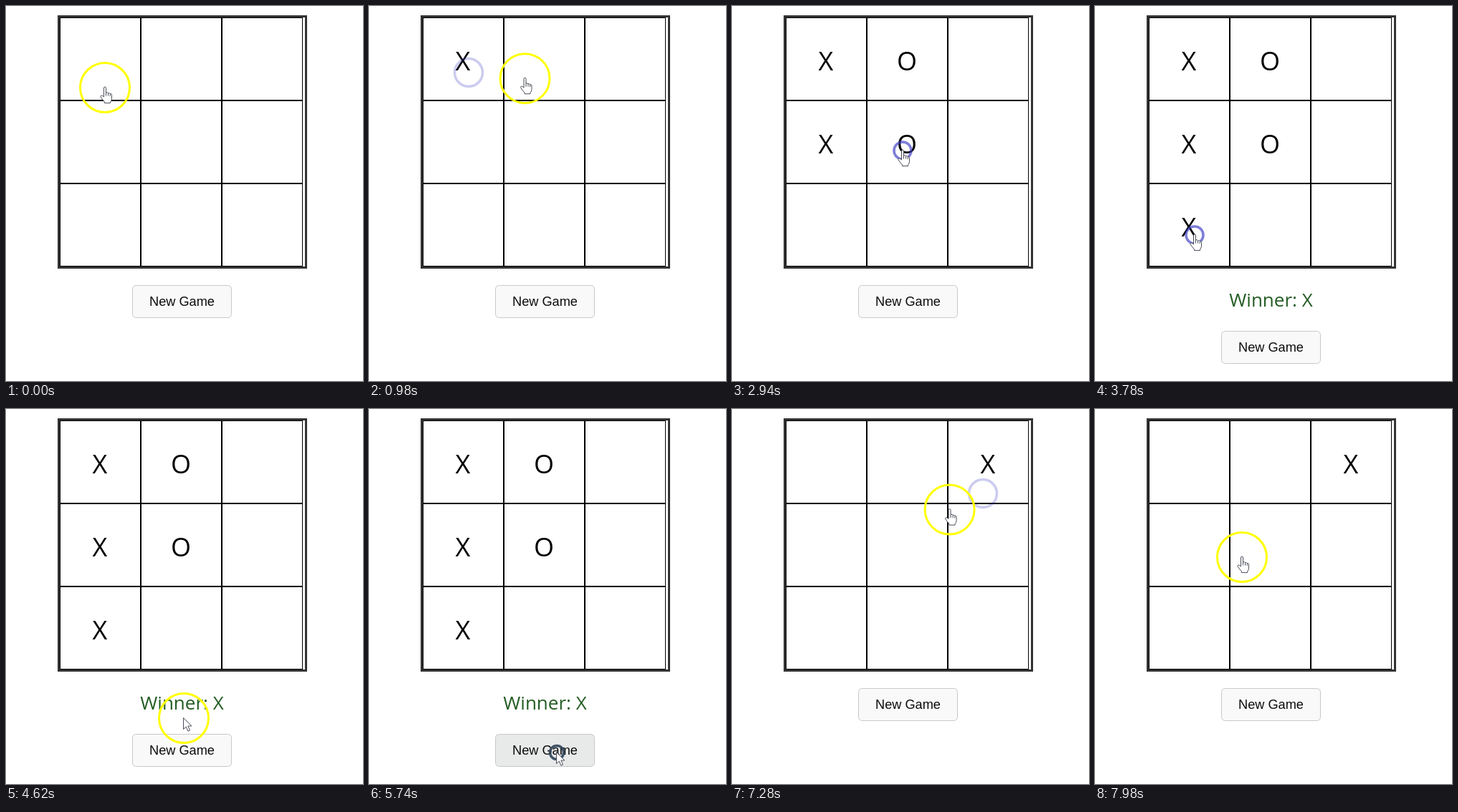
Write an HTML page that moves like this. It is 498 by 524 pixels and loops after 8000 ms.

```html
<!DOCTYPE html>
<html lang="en">
<head>
<meta charset="utf-8">
<title>Tic-tac-toe</title>
<style>
  html, body { margin: 0; width: 100%; height: 100%; overflow: hidden; background: #fff; }
  svg { display: block; }
  text { text-anchor: middle; }
  .mark { font: 36px "Open Sans", "Noto Sans", sans-serif; }
  #status { font: 26px "Open Sans", "Noto Sans", sans-serif; fill: #245c24; }
  #button text { font: 18.2px "Liberation Sans", Arial, sans-serif; fill: #0c0c0c; }
  #button rect { stroke: #c8c8c8; }
  #cells rect { fill: none; stroke: #000; }
  #pointer path { fill: #fff; stroke: #4a4e58; stroke-linejoin: round; }
</style>
</head>
<body>
<svg width="498" height="524" viewBox="0 0 498 524">
  <rect x="73.5" y="14.5" width="345" height="351" fill="none" stroke="#333" stroke-width="3"/>
  <g id="cells"></g>
  <text id="status" x="245.5" y="420">Winner: X</text>
  <g id="button">
    <rect x="176.5" y="390.5" width="138" height="45" rx="5"/>
    <text x="245.5" y="419">New Game</text>
  </g>
  <circle id="ripple" fill="none"/>
  <g id="pointer">
    <circle id="halo" r="34.5" fill="none" stroke="#ff0" stroke-width="3"/>
    <path id="arrow" d="M-.5-.5v16l3.8-3.4 2.6 6 2.6-1.1-2.6-6h5z"/>
    <g id="hand">
      <path d="M-1.5 13V1q0-2 1.5-2t1.5 2v6q2-1 3 .8 2-1 2.7.8 2.3-.6 2.3 2v4.5q0 3-2 5v1.5h-8V20q-2.5-2.5-5.7-7.5 1-3 3.6-.5z"/>
      <path d="M1.5 7v4.5M4.5 8v3.5M7.2 9v3"/>
    </g>
  </g>
</svg>
<script>
const LOOP = 8000, STEP = 140;
const LEAD = 140, REST = 280, RIPPLE_LIFE = 840, HALO_HIDDEN = 350;
const BOARD = { x: 75, y: 16 }, CELL = { w: 113, h: 116 };

// The pointer rests around each press and passes through the other stops
const pass = (at, x, y) => ({ from: at, to: at, x, y });
const press = (at, x, y) => ({ at, from: at - LEAD, to: at + REST, x, y });
const stops = [
  pass(0, 138, 114),
  press(420, 139, 93),
  press(1260, 245, 104),
  press(1960, 125, 205),
  press(2800, 238, 202),
  press(3640, 139, 320),
  pass(4620, 248, 432),
  press(5740, 262, 480),
  pass(6440, 338, 126),
  press(6720, 350, 118),
  pass(7840, 171, 205),
  pass(7980, 205, 207)
];
const presses = stops.filter(s => s.at);

const $ = id => document.getElementById(id);
const show = (el, on) => el.setAttribute("visibility", on ? "visible" : "hidden");
const set = (el, attrs) => {
  for (const name in attrs) el.setAttribute(name, attrs[name]);
};
function add(tag, attrs) {
  const el = document.createElementNS("http://www.w3.org/2000/svg", tag);
  set(el, attrs);
  return $("cells").appendChild(el);
}

const marks = Array.from({ length: 9 }, (_, i) => {
  const x = BOARD.x + CELL.w * (i % 3), y = BOARD.y + CELL.h * Math.floor(i / 3);
  add("rect", { x: x + .5, y: y + .5, width: CELL.w - 1, height: CELL.h - 1 });
  return add("text", { class: "mark", x: x + 56, y: y + 73.5 });
});

function pointerAt(t) {
  const next = stops.findIndex(s => s.from > t);
  const a = stops[next < 0 ? stops.length - 1 : next - 1], b = stops[next];
  if (!b || t <= a.to) return [a.x, a.y];
  const u = (t - a.to) / (b.from - a.to), k = u * u * (3 - 2 * u);
  return [a.x + (b.x - a.x) * k, a.y + (b.y - a.y) * k];
}

// Each press takes effect one step later: a mark in a cell, or a new game below the board
function boardAt(t) {
  let board = [], turn = 0;
  for (const { at, x, y } of presses) {
    if (at + STEP > t) break;
    const col = Math.floor((x - BOARD.x) / CELL.w), row = Math.floor((y - BOARD.y) / CELL.h);
    if (row > 2) { board = []; turn = 0; }
    else board[row * 3 + col] = "XO"[turn++ % 2];
  }
  return board;
}

function drawRipple(t) {
  const last = presses.filter(p => p.at <= t).pop();
  const age = last ? t - last.at : Infinity;
  const pressed = age < STEP;
  show($("ripple"), age < RIPPLE_LIFE);
  show($("halo"), age >= HALO_HIDDEN);
  if (age < RIPPLE_LIFE) set($("ripple"), {
    cx: last.x, cy: last.y,
    r: 9.5 + 10 * Math.min(1, age / 560),
    stroke: pressed ? "#2c4258" : "#3c3cc4",
    "stroke-width": 3.5,
    opacity: pressed ? .9 : .8 * (1 - age / RIPPLE_LIFE)
  });
}

function draw(t) {
  const [x, y] = pointerAt(t);
  const board = boardAt(t);
  const won = [0, 1, 2].some(c => board[c] && board[c] === board[c + 3] && board[c] === board[c + 6]);
  const top = won ? 454 : 390;
  const hover = x > 176 && x < 315 && y > top && y < top + 46;
  const overBoard = x > 72 && x < 420 && y > 13 && y < 367;

  marks.forEach((el, i) => el.textContent = board[i] || "");
  show($("status"), won);
  set($("button"), { transform: `translate(0 ${top - 390})`, fill: hover ? "#e8e9e9" : "#f9f9f9" });
  drawRipple(t);
  set($("pointer"), { transform: `translate(${x} ${y})` });
  show($("hand"), overBoard);
  show($("arrow"), !overBoard);
}

function frame() {
  const t = performance.now() % LOOP;
  draw(t - t % STEP);
  requestAnimationFrame(frame);
}
frame();
</script>
</body>
</html>
```
